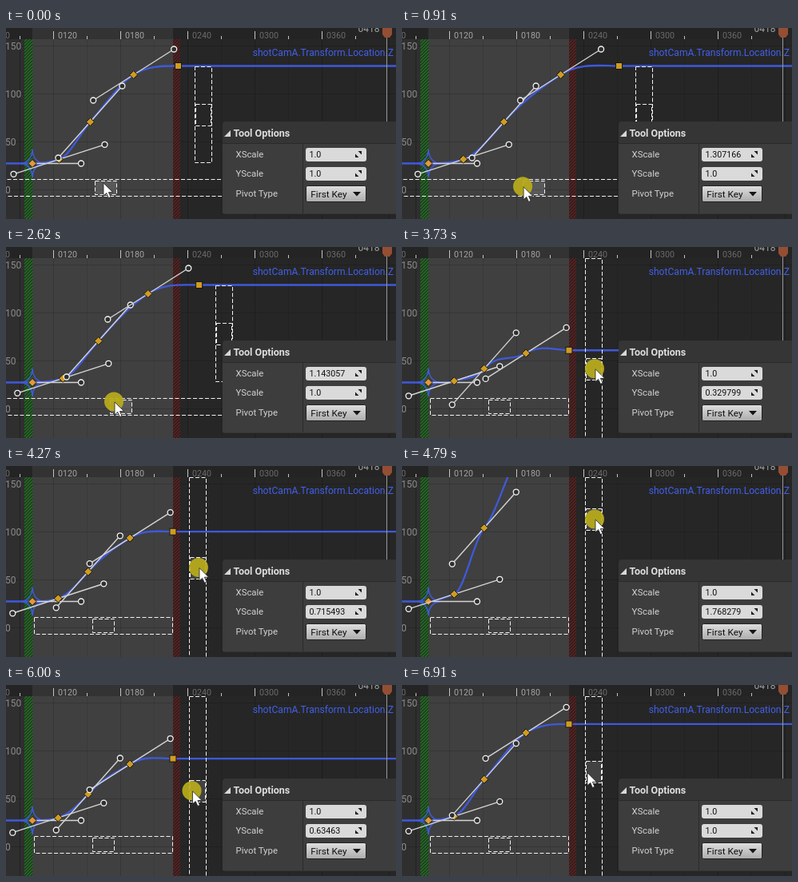
Animation of 488x239 px, one loop 6.94 s. Source, as an HTML page:

```html
<!DOCTYPE html>
<html lang="en">
<head>
<meta charset="utf-8">
<title>Curve transform tool</title>
<style>
html, body { margin: 0; width: 100%; height: 100%; overflow: hidden; background: #262626; }
svg { display: block; width: 488px; height: 239px; }
text { font-family: Roboto, "Open Sans", sans-serif; white-space: pre; }
.dash { fill: none; stroke: #f2f2f2; stroke-width: 1; stroke-dasharray: 5 2.5; }
.lit { fill: rgba(255,255,255,.13); }
.arm { stroke: #d4d4d4; stroke-width: 1.4; }
.knob { fill: #303030; stroke: #f4f4f4; stroke-width: 1.3; }
.key { fill: #d09c20; stroke: #171717; stroke-width: 1; }
.curve { fill: none; stroke: #3e59dc; stroke-width: 2.3; }
.label { font-size: 11.4px; fill: #d2d2d2; }
.field { fill: #dadada; }
.value { font-size: 10.7px; fill: #101010; }
</style>
</head>
<body>
<svg id="stage" viewBox="0 0 488 239">
  <defs>
    <pattern id="green" width="4" height="4" patternUnits="userSpaceOnUse">
      <rect width="4" height="4" fill="#1c3d1c"/>
      <path d="M-1 1L1 -1M0 4L4 0M3 5L5 3" stroke="#2a722a" stroke-width="1.2"/>
    </pattern>
    <pattern id="red" width="4" height="4" patternUnits="userSpaceOnUse">
      <rect width="4" height="4" fill="#301c1c"/>
      <path d="M-1 1L1 -1M0 4L4 0M3 5L5 3" stroke="#642424" stroke-width="1.2"/>
    </pattern>
    <linearGradient id="button" x2="0" y2="1">
      <stop stop-color="#dedede"/><stop offset="1" stop-color="#acacac"/>
    </linearGradient>
  </defs>
  <rect width="488" height="239" fill="#262626"/>
  <rect width="24" height="239" fill="#2f2f2f"/>
  <rect x="33" width="176" height="239" fill="#404040"/>
  <g id="grid"></g>
  <rect x="23" y="14" width="10.5" height="225" fill="url(#green)"/>
  <rect x="209" y="14" width="9" height="225" fill="url(#red)"/>
  <path id="curve" class="curve"/>
  <path d="M19 169.5Q32 168 33 152Q34 168 48 169.5Q34 171 33 187Q32 171 19 169.5Z" fill="none" stroke="#3e59dc" stroke-width="1.5"/>
  <g id="keys"></g>
  <rect id="boxX" class="dash"/><rect id="gripX" class="dash"/>
  <rect id="boxY" class="dash"/><rect id="gripY" class="dash"/>
  <rect width="488" height="14" fill="#242424"/>
  <rect x="33" width="176" height="14" fill="#333"/>
  <g id="ruler"></g>
  <text x="308.7" y="34.5" font-size="12.1" fill="#4160ea">shotCamA.Transform.Location.Z</text>
  <text x="440.5" y="4.8" font-size="12" fill="#a0a0a0">0418</text>
  <path d="M476.5 12V117" stroke="#989898"/>
  <path d="M471 0H483V8L480 12H474L471 8Z" fill="#944e33"/>
  <g id="panel">
    <rect x="271" y="117" width="222" height="116" rx="4" fill="#353535"/>
    <rect x="271" y="145" width="217" height="87" fill="#3d3d3d"/>
    <path d="M271 144.5H488M371.5 145V232" stroke="#2a2a2a"/>
    <path d="M281 128V136H273Z" fill="#d8d8d8"/>
    <text x="284.5" y="136" font-size="12.5" font-weight="700" fill="#dedede">Tool Options</text>
    <text class="label" x="287.5" y="162">XScale</text>
    <text class="label" x="287.5" y="186">YScale</text>
    <text class="label" x="287.5" y="211">Pivot Type</text>
    <rect class="field" x="375" y="150" width="76" height="17" rx="3"/>
    <rect class="field" x="375" y="174" width="76" height="17" rx="3"/>
    <rect x="375.5" y="197.5" width="75" height="20" rx="2" fill="url(#button)" stroke="#222"/>
    <text id="valX" class="value" x="379.5" y="162">1.0</text>
    <text id="valY" class="value" x="379.5" y="186">1.0</text>
    <text x="381.3" y="211.5" font-size="11.8" fill="#101010">First Key</text>
    <path d="M434 205H444L439 210.5Z" fill="#151515"/>
    <path id="spin" d="M440.5 154H445V158.5ZM437 157.5V162H441.5ZM440.5 178H445V182.5ZM437 181.5V186H441.5Z" fill="#1a1a1a"/>
  </g>
  <circle id="press" r="12" fill="#b9ac1c" fill-opacity=".93"/>
  <path id="mouse" d="M0 0V16L3.7 12.6L6.4 18.6L9 17.4L6.4 11.6H11.6Z" fill="#fff" stroke="#222" stroke-width=".8"/>
</svg>
<script>
const LOOP = 6940, X0 = 33, Y0 = 169.5;
const $ = id => document.getElementById(id);

// Keys relative to the pivot, with the fixed half-length of their tangent handles
const keys = [
  { x: 0, y: 0, hx: 61, hy: 0 },
  { x: 33.5, y: 5.2, hx: 57, hy: 18.5 },
  { x: 72.4, y: 52, hx: 40, hy: 45 },
  { x: 126.7, y: 111, hx: 50.5, hy: 32 },
  { x: 182.5, y: 122, hx: 1, hy: 0 }
];

const scaleX = [[30, 1], [700, 1.14], [1050, 1.38], [1420, 1.14], [1660, .669869], [1790, .669869],
  [2120, .97], [2400, 1.22], [2620, 1.143057], [2840, .964]];
const scaleY = [[3230, 1], [3580, .56], [3730, .329799], [3960, .09], [4315, .83], [4680, 1.93],
  [4790, 1.768279], [5030, .9], [5360, .068257], [5520, -.16], [5735, .14], [6300, .988]];
const dipY = [[0, 194], [700, 198], [1050, 199], [1420, 198], [1660, 195.5], [2620, 194]];
const driftX = [[3200, 242], [4790, 242], [5360, 238.3], [6300, 232.5], [6880, 232.5], [6910, 232]];
const reach = [[2870, 0], [3200, 1]];
const holds = [[2620, 40], [3730, 30], [4790, 30], [5360, 30]];

// Monotone cubic interpolation, flat at the turning points
function track(pts, t) {
  const n = pts.length - 1;
  if (t <= pts[0][0]) return pts[0][1];
  if (t >= pts[n][0]) return pts[n][1];
  let i = 0;
  while (t >= pts[i + 1][0]) i++;
  const rate = j => (pts[j + 1][1] - pts[j][1]) / (pts[j + 1][0] - pts[j][0]);
  const slope = j => {
    if (j === 0 || j === n) return 0;
    const a = rate(j - 1), b = rate(j);
    return a * b <= 0 ? 0 : 2 * a * b / (a + b);
  };
  const d = pts[i + 1][0] - pts[i][0], u = (t - pts[i][0]) / d, v = 1 - u;
  return pts[i][1] * (1 + 2 * u) * v * v + pts[i + 1][1] * (3 - 2 * u) * u * u
    + d * (slope(i) * u * v * v - slope(i + 1) * u * u * v);
}

function make(parent, tag, attrs, text) {
  const el = document.createElementNS("http://www.w3.org/2000/svg", tag);
  set(el, attrs);
  if (text) el.textContent = text;
  parent.append(el);
  return el;
}
function set(el, attrs) {
  for (const k in attrs) el.setAttribute(k, attrs[k]);
}
function box(id, x, y, width, height) {
  set($(id), { x, y, width, height });
}
const bent = (s, low, high) => (s - 1) * (s < 1 ? low : high);
const show = s => s === 1 ? "1.0" : String(+s.toFixed(6));
const inside = x => x > X0 && x < 209;

for (let i = 0; i < 7; i++) {
  const x = -24.5 + 84 * i, half = x + 42;
  const line = (at, shade) => make($("grid"), "path", { d: `M${at} 14V239`, stroke: shade });
  const tick = (at, top) => make($("ruler"), "path", { d: `M${at} ${top}V14`, stroke: "#c4c4c4" });
  line(x, inside(x) ? "#363636" : "#1e1e1e");
  line(half, inside(half) ? "#3a3a3a" : "#222");
  tick(half, 10);
  if (x < 470) {
    tick(x, 4);
    make($("ruler"), "text", { x: x + 5.5, y: 13, "font-size": 10.7, fill: inside(x) ? "#a6a6a6" : "#6c6c6c" },
      String(60 + 60 * i).padStart(4, "0"));
  }
}
["150", "100", "50", "0"].forEach((label, i) => {
  const y = 22.5 + 60 * i;
  make($("grid"), "path", { d: `M0 ${y}H488`, stroke: "#000", "stroke-opacity": .16 });
  make($("ruler"), "text", { x: -1, y: y + 4.5, "font-size": 12, fill: "#8c8c8c" }, label);
});

const parts = keys.map((k, i) => {
  const g = make($("keys"), "g", {}), first = i === 0;
  if (i < 4) {
    make(g, "path", { class: "arm", d: `M${first ? 0 : -k.hx} ${k.hy}L${k.hx} ${-k.hy}` });
    if (!first) make(g, "circle", { class: "knob", r: 3.5, cx: -k.hx, cy: k.hy });
    make(g, "circle", { class: "knob", r: 3.5, cx: k.hx, cy: -k.hy });
    make(g, "path", { class: "key", d: "M0 -5L5 0L0 5L-5 0Z" });
  } else make(g, "rect", { class: "key", x: -4, y: -4, width: 8, height: 8 });
  return g;
});
parts[0].lastChild.style.fill = "#e3983a";

function draw(t) {
  for (const [start, len] of holds) if (t >= start && t < start + len) t = start;
  const sx = track(scaleX, t), sy = track(scaleY, t);
  const dragX = t >= 30 && t < 2860, dragY = t >= 3230 && t < 6515;
  const modeX = t < 2910, modeY = t >= 3130;

  const pts = keys.map(k => ({ x: X0 + k.x * sx, y: Y0 - k.y * sy, m: -k.hy / k.hx }));
  let d = `M0 ${Y0}H${X0}`;
  pts.forEach((p, i) => {
    set(parts[i], { transform: `translate(${p.x} ${p.y})` });
    if (!i) return;
    const q = pts[i - 1], w = (p.x - q.x) / 3;
    d += `C${q.x + w} ${q.y + q.m * w} ${p.x - w} ${p.y - p.m * w} ${p.x} ${p.y}`;
  });
  set($("curve"), { d: d + "H488" });

  const left = Math.round(pts[4].x) + 20.5;
  const midX = modeX ? 124.5 + bent(sx, 72.7, 133) : 122;
  const pullY = 109 - bent(sy, 65.3, 54.7);
  const midY = dragY ? pullY : 109;
  if (modeX) box("boxX", -6, 189.5, 600, 21);
  else box("boxX", 35.5, 189.5, 173, 21);
  box("gripX", Math.round(midX - 14) + .5, 191.5, 27, 17);
  if (modeY) box("boxY", left, 14.5, 21, 240);
  else box("boxY", left, 48.5, 21, 120);
  box("gripY", left + 1, Math.round(midY - 14) + .5, 19, 27);
  $("gripX").classList.toggle("lit", modeX);
  $("gripY").classList.toggle("lit", modeY);

  $("valX").textContent = dragX ? show(sx) : "1.0";
  $("valY").textContent = dragY ? show(sy) : "1.0";

  const go = track(reach, t);
  const fromX = 122 + bent(sx, 82, 98), fromY = track(dipY, t);
  const mx = fromX + (track(driftX, t) - fromX) * go;
  const my = fromY + (pullY - fromY) * go;
  set($("mouse"), { transform: `translate(${mx} ${my})` });
  set($("press"), { cx: mx - 1, cy: my - .5, visibility: dragX || dragY ? "visible" : "hidden" });
}

const begin = performance.now();
function tick() {
  draw((performance.now() - begin) % LOOP);
  requestAnimationFrame(tick);
}
draw(0);
requestAnimationFrame(tick);
</script>
</body>
</html>
```
